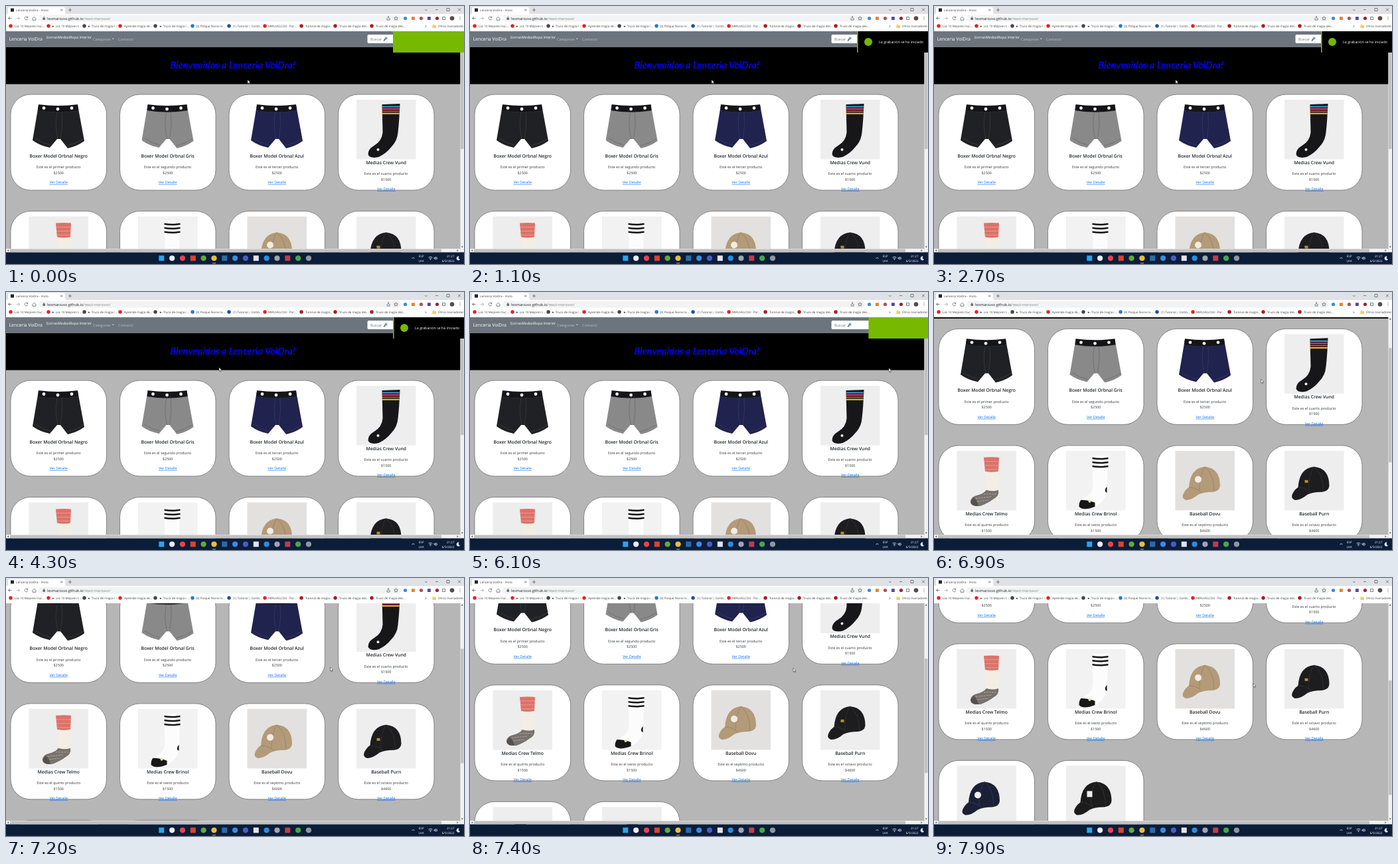
Write an HTML page that moves like this. It is 690 px wide and 388 px high and loops after 8000 ms.

```html
<!DOCTYPE html>
<html lang="es">
<head>
<meta charset="utf-8">
<style>
html, body { margin: 0; width: 100%; height: 100%; overflow: hidden; background: #b6b6b6; }
svg { display: block; width: 690px; height: 388px; }
text { font-family: "Open Sans", "Noto Sans", sans-serif; text-rendering: geometricPrecision; white-space: pre; }
.glyph { fill: none; stroke: #5f6368; stroke-width: .8; }
</style>
</head>
<body>
<svg id="stage" viewBox="0 0 690 388"></svg>
<script>
const PERIOD = 8000;
const SHOP = 'Lenceria VoiDra';

const rect = (x, y, w, h, fill, extra = '') =>
  `<rect x="${x}" y="${y}" width="${w}" height="${h}" fill="${fill}" ${extra}/>`;
const dot = (x, y, r, fill) => `<circle cx="${x}" cy="${y}" r="${r}" fill="${fill}"/>`;
const path = (d, fill, extra = '') => `<path d="${d}" fill="${fill}" ${extra}/>`;
const glyph = (d, extra = '') => `<path class="glyph" d="${d}" ${extra}/>`;
const label = (x, y, size, fill, text, extra = '') =>
  `<text x="${x}" y="${y}" font-size="${size}" fill="${fill}" ${extra}>${text}</text>`;
const centered = 'text-anchor="middle"';

// Product drawings, in card coordinates
function boxer(color, shade) {
  return path('M42 16Q72 20 101 16L111 70Q100 78 86 81L75 67L70 67L59 80Q44 77 33 69Z', color) +
    path('M42 24Q72 29 102 24M70 27Q66 46 71 67M77 27Q79 46 75 67M37 66Q47 73 60 76M85 77Q99 74 109 67',
      'none', `stroke="${shade}" stroke-width=".8"`) +
    path('M42 15Q72 19 101 15L102 24Q72 29 41 24Z', '#151517') +
    [50, 71, 92].map(x => dot(x, x === 71 ? 22 : 20.5, 2.4, '#f2f2f2')).join('');
}

const photo = fill => rect(27.5, 8, 89.5, 89.5, fill);

function blackSock() {
  const stripes = ['#28a6cf', '#e0338c', '#dc3a34', '#f3bc31'];
  return photo('#eeeeef') +
    path('M66 15L93 14Q92 40 90 57Q89 70 80 79Q72 89 61 94Q47 97 45 90Q45 82 54 77Q66 70 67 57Z', '#17171a') +
    stripes.map((c, i) => rect(66.4, 17.5 + i * 3.4, 26, 2, c)).join('') +
    dot(60, 83, 2, '#eee');
}

function redSock() {
  return photo('#ededed') +
    path('M70 38H91L90 70L72 72Z', '#f3eee4') +
    path('M68 18Q80 17 91 18L90 39Q80 41 70 39Z', '#dc7268') +
    path('M69 24H91M69 30H91M70 36H90', 'none', 'stroke="#eba49a" stroke-width=".8"') +
    path('M72 67Q82 70 90 67Q92 76 82 81Q74 87 63 91Q49 92 48 84Q49 77 58 75Q67 73 72 67Z', '#77736c') +
    path('M52 80L80 77M50 85L75 82M68 73L87 73', 'none', 'stroke="#aaa69c" stroke-width="1" stroke-dasharray="3 1"') +
    path('M53 78Q58 83 60 91Q48 92 48 84Z', '#55524e');
}

function whiteSock() {
  return photo('#f2f2f2') +
    path('M67 15H91L89 70Q86 84 72 92Q52 99 47 91Q47 82 58 77Q67 72 68 60Z', '#fcfcfc') +
    [19, 25, 31].map(y => path(`M67 ${y - 1}Q79 ${y + 1} 91 ${y - 1}V${y + 1.5}Q79 ${y + 3.5} 67 ${y + 1.5}Z`, '#151515')).join('') +
    path('M89 62Q85 66 87 70L89 71Z', '#151515') +
    path('M50 82Q61 82 71 86L71 92Q53 99 47 92Q47 85 50 82Z', '#171717') +
    dot(63, 84, 2, '#e6dfa3');
}

function cap(color, shade, mark, backdrop = '#eeeeee', dx = 0) {
  return photo(backdrop) + `<g transform="translate(${dx})">` +
    path('M48 63Q50 34 72 32Q95 34 95 61Q94 69 84 70Q70 70 62 74Q51 83 43 82Q36 79 40 72Q43 66 48 63Z', color) +
    path('M72 32Q64 44 64 67M72 32Q86 43 86 69M48 63Q59 63 68 71', 'none', `stroke="${shade}" stroke-width=".8"`) +
    mark + '</g>';
}

const products = [
  ['Boxer Model Orbnal Negro', 'primer', 2500, boxer('#202124', '#3b3c3f')],
  ['Boxer Model Orbnal Gris', 'segundo', 2500, boxer('#898989', '#6b6b6b')],
  ['Boxer Model Orbnal Azul', 'tercer', 2500, boxer('#20234d', '#353963')],
  ['Medias Crew Vund', 'cuarto', 1500, blackSock()],
  ['Medias Crew Telmo', 'quinto', 1500, redSock()],
  ['Medias Crew Brinol', 'sexto', 1500, whiteSock()],
  ['Baseball Dovu', 'septimo', 4600, cap('#b39a78', '#978062', dot(62, 51, 5, '#f0ece4'), '#e2e1df')],
  ['Baseball Purn', 'octavo', 4600, cap('#1d1d1f', '#343437', rect(58, 52, 5, 4, '#b98a3d'))],
  ['', '', 0, cap('#1b2036', '#343a54', dot(62, 52, 5, '#f0f0f0'), '#eeeeee', -3)],
  ['', '', 0, cap('#1c1c1d', '#363638', rect(58, 46, 8, 9, '#eeeeee'), '#eeeeee', 1)]
];

function card([name, order, price, art], i) {
  const x = 7 + (i % 4) * 164.5, y = 133 + Math.floor(i / 4) * 175.5;
  const drop = i < 3 ? 0 : 10;
  let out = rect(0, 0, 144.5, 144, '#fff', 'rx="30" stroke="#6f6f6f" stroke-width=".8"') + art;
  if (name) {
    out += label(72.2, 94.8 + drop, 6.8, '#212529', name, centered + ' font-weight="600"') +
      label(72.2, 111.3 + drop, 5.45, '#34383c', `Este es el ${order} producto`, centered) +
      label(72.2, 119.9 + drop, 5.45, '#34383c', '$' + price, centered) +
      label(72.2, 134.4 + drop, 5.45, '#0d6efd', 'Ver Detalle', centered + ' text-decoration="underline"');
  }
  return `<g transform="translate(${x} ${y})">${out}</g>`;
}

function page() {
  return rect(0, 38, 684.5, 24, '#6c757d') +
    label(4.5, 52, 6.9, '#fff', SHOP) +
    label(60.5, 48.5, 5.45, '#fff', 'GorrasMediasRopa Interior') +
    label(131, 51.5, 5.45, '#b9bec2', 'Categorias') + path('M159.5 48.5h3.6l-1.8 2z', '#b9bec2') +
    label(169, 51.5, 5.45, '#b9bec2', 'Contacto') +
    rect(544.5, 43, 62, 13, '#fff', 'rx="2"') + label(549, 51.5, 5.45, '#6c757d', 'Buscar') +
    path('M571.5 49.5l-2.3 2.8', 'none', 'stroke="#333" stroke-width="1.2"') + dot(572.5, 48.4, 2, '#5ba5d8') +
    rect(0, 62, 684.5, 55.5, '#000') +
    label(341.5, 94, 14.6, '#0000f5', `Bienvenidos a ${SHOP}!`,
      centered + ' font-weight="700" font-style="italic" style="font-family:Lato,sans-serif"') +
    products.map(card).join('');
}

const bookmarks = [
  [7, 13, '#f01c1c', 'Los 10 Mejores truc...'], [64, 69, '#f01c1c', '► Los 10 Mejores t...'],
  [118, 123, '#444', '► Truco de magia r...'], [172, 178, '#f01c1c', 'Aprende magia 46...'],
  [225, 231, '#444', '► Truco de magia r...'], [281, 286, '#1877f2', '(4) Parque Norvo Iv...'],
  [336, 342, '#1b4f9c', '(1) Tutorial | Comb...'], [390, 395, '#f01c1c', 'MIRUVELCO4 - Por...'],
  [445, 451, '#b3161b', 'Tutorial de magia...'], [496, 502, '#b3161b', 'Truco de magia des...'],
  [551, 557, '#b3161b', 'Truco de magia des...']
];

function browserTop() {
  const extensions = ['#3f86e8', '#e0802f', '#b94b55', '#5046a0', '#9a2630'];
  return rect(0, 0, 690, 12, '#dee1e6') +
    path('M1 12Q3 12 3 9V4Q3 1.5 6 1.5H86Q89 1.5 89 4V9Q89 12 91 12Z', '#fff') +
    rect(7, 3.5, 5, 5, '#222') + label(15, 8, 4.6, '#3c4043', SHOP + ' - Inicio') +
    glyph('M82 4.5l3 3m0-3l-3 3M96.5 3.5v5m-2.5-2.5h5M631 5l1.8 1.8L634.6 5M647 5.5h4M664 3.5h4v4h-4zM681 3.5l4 4m0-4l-4 4') +
    rect(0, 12, 690, 26, '#fff') + rect(49, 13.5, 546, 10, '#f1f3f4', 'rx="5"') +
    glyph('M8.5 18.5h-5m2.3-2.3l-2.3 2.3 2.3 2.3M40 18.5l2.5-2.5 2.5 2.5v2.8h-5z') +
    glyph('M15.5 18.5h5m-2.3-2.3l2.3 2.3-2.3 2.3', 'opacity=".5"') +
    glyph('M32.6 17.2a2.4 2.4 0 1 0 .2 2.2M32.8 15.7v1.7h-1.7') +
    rect(55.5, 18, 3.4, 2.8, '#5f6368') + glyph('M56.2 18v-1q1-1.4 2 0v1') +
    label(62, 20.6, 5.5, '#80868b', '<tspan fill="#202124">leomarzuvo.github.io</tspan>/react-marzuvo/') +
    glyph('M574 18v3h4v-3M576 19v-3.3m-1.3 1.1l1.3-1.1 1.3 1.1') +
    glyph('M587.5 15.8l.9 1.8 2 .2-1.5 1.4.4 2-1.8-1-1.8 1 .4-2-1.5-1.4 2-.2z') +
    extensions.map((c, i) => i % 2 ? rect(599 + i * 12, 16.2, 4.8, 4.8, c) : dot(601.5 + i * 12, 18.5, 2.6, c)).join('') +
    glyph('M657.5 16.5h4v4h-4z') + dot(672, 18.5, 3.3, '#5b4a48') +
    [16.5, 18.5, 20.5].map(y => dot(684, y, .6, '#5f6368')).join('') +
    bookmarks.map(([ix, tx, c, text]) => dot(ix, 30, 2.7, c) + label(tx, 31.9, 4.55, '#3c4043', text)).join('') +
    label(631, 32, 5.5, '#3c4043', '»') + path('M642.5 28h2l.8 1h2.7v4h-5.5z', '#f5cc5c') +
    label(651, 31.9, 4.55, '#3c4043', 'Otros marcadores');
}

function scrollbars() {
  return rect(684.5, 38, 5.5, 332, '#f1f1f1') + path('M685.8 41.5h3l-1.5-2z', '#555') + path('M685.8 361.5h3l-1.5 2z', '#555') +
    `<rect id="thumb" x="685" y="43" width="4.5" height="172" fill="#c1c1c1"/>` +
    rect(0, 365, 684.5, 5.5, '#f1f1f1') + rect(6, 365.5, 650, 4.5, '#c1c1c1') +
    path('M4 366.2v3l-2-1.5z', '#555') + path('M679.5 366.2v3l2-1.5z', '#555');
}

function taskbar() {
  const icons = ['#2aa5ee', '#e8edf2', '#e6444f', '#d9442c', '#6ba539', '#e9bd3b', '#2b6da6', '#3c8be6',
    '#4b5ac8', '#e4e4ea', '#2b8ede', '#9fa3b8', '#c43b4c', '#4aa54c', '#8f979f'];
  return rect(0, 370.5, 690, 17.5, '#0c1d38') +
    icons.map((c, i) => {
      const x = 234.3 + i * 15.83;
      return i % 3 ? dot(x, 379.3, 4.1, c) : rect(x - 4, 375.3, 8, 8, c);
    }).join('') +
    rect(311, 386.3, 5, 1, '#9aa6b8') +
    glyph('M611.5 380l2-2 2 2M636.5 378.3q3-2.6 6 0M637.7 380q1.8-1.5 3.6 0M645 378.5h1.3l1.5-1.2v4l-1.5-1.2H645zM649 377.8q1 1.5 0 3',
      'style="stroke:#e8ebef"') + dot(639.5, 381.3, .7, '#e8ebef') +
    label(625.5, 378.4, 4.5, '#fff', 'ESP', centered) + label(625.5, 384.6, 4.5, '#fff', 'LAA', centered) +
    label(675.5, 378.4, 4.5, '#fff', '21:27', 'text-anchor="end"') +
    label(675.5, 384.6, 4.5, '#fff', '6/5/2022', 'text-anchor="end"') +
    path('M682.5 376.5a3 3 0 1 0 1.5 4.8a3 3 0 0 1-1.5-4.8z', '#e8ebef');
}

function notice() {
  return `<g id="notice">${rect(583, 38, 107, 32, '#76b900')}</g>` +
    `<g id="message">${rect(584.6, 38, 106, 32, '#000')}${dot(600, 54, 6, '#76b900')}` +
    label(616, 56.1, 5.35, '#fff', 'La grabación se ha iniciado') + '</g>';
}

document.getElementById('stage').innerHTML =
  rect(0, 0, 690, 388, '#b6b6b6') + `<g id="page">${page()}</g>` +
  browserTop() + scrollbars() + taskbar() + notice() +
  path('M0 0V5.6L1.4 4.4L2.3 6.5L3.2 6.1L2.3 4.1H4.1Z', '#fff', 'id="pointer" stroke="#222" stroke-width=".5"');

const [pageEl, thumbEl, noticeEl, messageEl, pointerEl] =
  ['page', 'thumb', 'notice', 'message', 'pointer'].map(id => document.getElementById(id));

const progress = (t, from, to) => Math.min(1, Math.max(0, (t - from) / (to - from)));
const smooth = p => p * p * (3 - 2 * p);
const steady = p => p;

// keys: [time, value, value...]
function track(keys, t, ease) {
  let i = 0;
  while (i < keys.length - 2 && t >= keys[i + 1][0]) i++;
  const [a, b] = [keys[i], keys[i + 1]];
  const p = ease(progress(t, a[0], b[0]));
  return a.slice(1).map((v, k) => v + (b[k + 1] - v) * p);
}

const scrollKeys = [[0, 0], [6300, 0], [6900, 77.5], [7400, 147.5], [7900, 209.5], [8000, 221]];
const pointerKeys = [[0, 364, 111], [3400, 364, 111], [4200, 321, 113.5], [5200, 321, 113.5], [6000, 631, 114.5],
  [6200, 631, 114.5], [6800, 493, 131], [7400, 487, 135.5], [7900, 481, 158.5], [8000, 481, 160]];

const shift = (el, x, y) => el.setAttribute('transform', `translate(${x} ${y})`);

function draw(t) {
  const [scroll] = track(scrollKeys, t, steady);
  shift(pageEl, 0, -scroll);
  thumbEl.setAttribute('y', 43 + scroll * .53);
  shift(pointerEl, ...track(pointerKeys, t, smooth));

  const enter = 1 - (1 - progress(t, 100, 450)) ** 3;
  const leave = progress(t, 5600, 5900) ** 2;
  shift(messageEl, 107 * (1 - enter + leave), 0);
  shift(noticeEl, 107 * progress(t, 6000, 6250) ** 2, 0);
}

function tick() {
  draw(performance.now() % PERIOD);
  requestAnimationFrame(tick);
}
tick();
</script>
</body>
</html>
```
